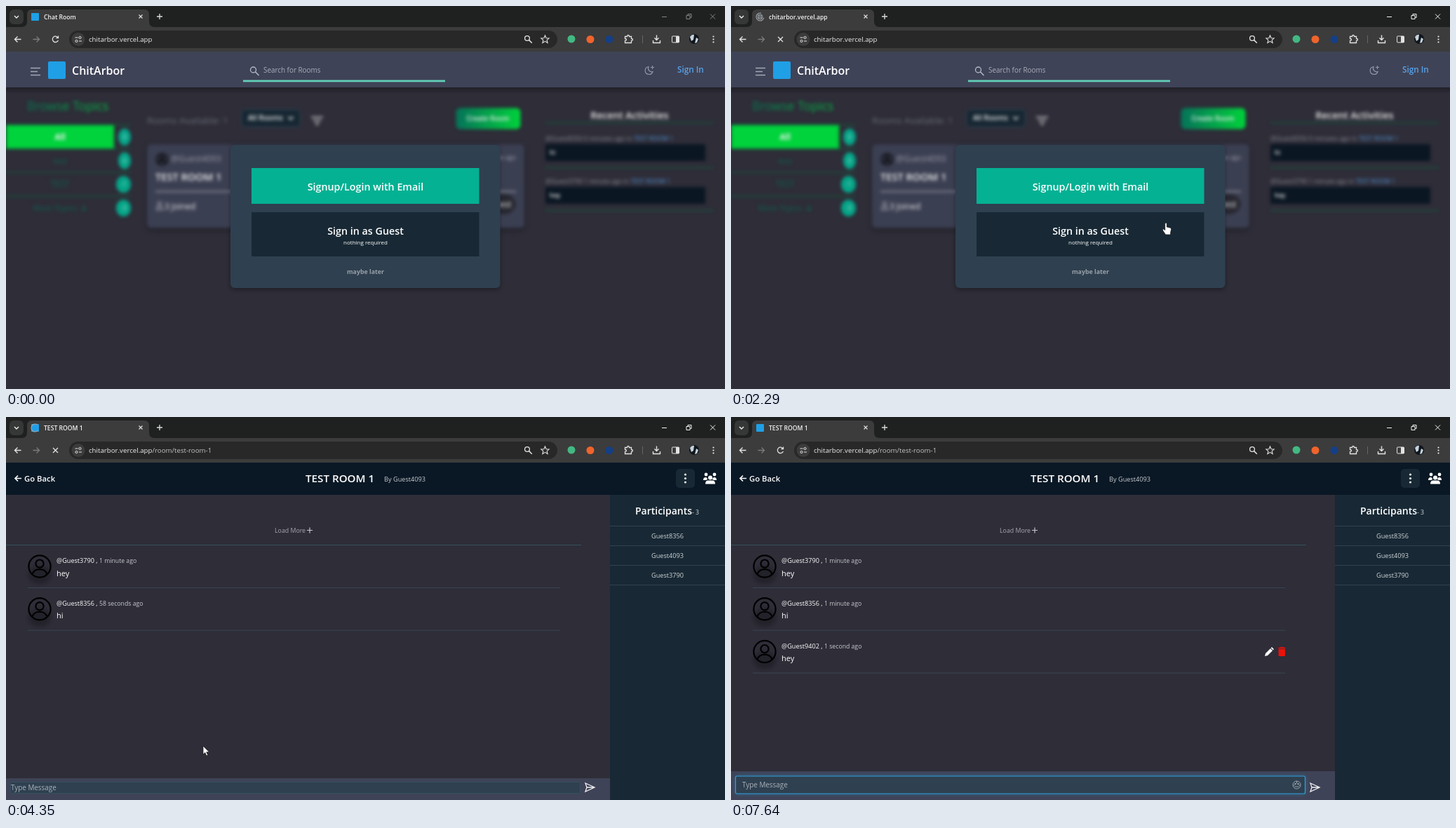
An HTML page for the animation above (8000 ms loop, 1025 px wide and 546 px high).

```html
<!DOCTYPE html>
<html lang="en">
<head>
<meta charset="utf-8">
<title>Chat Room</title>
<style>
  html, body { margin: 0; width: 100%; height: 100%; overflow: hidden; background: #2e2d38; }
  svg { display: block; width: 100%; height: 100%; }
  text { font-family: "Open Sans", "Noto Sans", sans-serif; white-space: pre; }
  .blurred { filter: blur(2.6px) brightness(.94); }
</style>
</head>
<body>
<svg id="stage" viewBox="0 0 1025 546"></svg>
<script>
const LOOP = 8000;
const SITE = 'chitarbor.vercel.app';
const HOST = 'Guest4093', FIRST = 'Guest8356', SECOND = 'Guest3790', SELF = 'Guest9402';

// Markup helpers
const text = (x, y, s, size, fill = '#fff', weight = 400, anchor = 'start', extra = '') =>
  `<text x="${x}" y="${y}" font-size="${size}" fill="${fill}" font-weight="${weight}" text-anchor="${anchor}" ${extra}>${s}</text>`;
const mid = (x, y, s, size, fill, weight) => text(x, y, s, size, fill, weight, 'middle');
const rect = (x, y, w, h, fill, r = 0, extra = '') =>
  `<rect x="${x}" y="${y}" width="${w}" height="${h}" rx="${r}" fill="${fill}" ${extra}/>`;
const disc = (x, y, r, fill, extra = '') => `<circle cx="${x}" cy="${y}" r="${r}" fill="${fill}" ${extra}/>`;
const line = (d, stroke = '#fff', width = 1.2, extra = '') =>
  `<path d="${d}" fill="none" stroke="${stroke}" stroke-width="${width}" ${extra}/>`;
const group = (id, body, extra = '') => `<g id="${id}" ${extra}>${body}</g>`;
const gradient = (id, from, to, attrs) =>
  `<linearGradient id="${id}" ${attrs}><stop stop-color="${from}"/><stop offset="1" stop-color="${to}"/></linearGradient>`;
const lens = (x, y, r, color) =>
  line(`M${x + r * .7} ${y + r * .7}l${r * 1.3} ${r * 1.3}`, color, 1.5) + disc(x, y, r, 'none', `stroke="${color}" stroke-width="1.3"`);
const dots = (x, y, gap, r) => [-1, 0, 1].map(i => disc(x, y + i * gap, r, '#eee')).join('');

function person(x, y, r, width, color = '#000') {
  const body = `M${x - r * .66} ${y + r * .68}C${x - r * .5} ${y + r * .12} ${x + r * .5} ${y + r * .12} ${x + r * .66} ${y + r * .68}`;
  const pen = `stroke="${color}" stroke-width="${width}"`;
  return disc(x, y, r, 'none', pen) + disc(x, y - r * .25, r * .36, 'none', pen) + line(body, color, width);
}

const defs = `<defs>
  ${gradient('heading', '#067257', '#00dc42', 'gradientUnits="userSpaceOnUse" x1="20" y1="0" x2="165" y2="0"')}
  ${gradient('create', '#057a5e', '#00e03f', '')}
  ${gradient('shade', 'rgba(0,0,0,.28)', 'rgba(0,0,0,0)', 'x2="0" y2="1"')}
  <filter id="soft" x="-50%" y="-50%" width="200%" height="200%"><feGaussianBlur stdDeviation="3"/></filter>
  <clipPath id="tabClip"><rect x="52" y="6" width="126" height="20"/></clipPath>
</defs>`;

function browser() {
  const icon = '#e3e3e3';
  return rect(0, 0, 1025, 31, '#1f2020') + rect(0, 30, 1025, 35, '#3c3c3c') +
    rect(5, 5, 20, 21, '#363737', 6) + line('M12 14l3 3 3-3', '#eee', 1.4) +
    `<path d="M22 30q8 0 8-8v-10q0-7 7-7h160q7 0 7 7v10q0 8 8 8z" fill="#3c3c3c"/>` +
    rect(36, 10, 11, 11, '#1f9fe6', 1, 'id="favicon"') +
    group('globe', disc(41.5, 15.5, 4, '#85888c') + line('M38 15h7M41.5 12v7', '#55585c', .8)) +
    group('spinner', line('M41.5 10a5.5 5.5 0 1 1-5.5 5.5', '#9da3ab', 1.2)) +
    text(54, 18.8, '', 8.6, '#f1f1f1', 600, 'start', 'id="tabTitle" clip-path="url(#tabClip)"') +
    line('M189.5 12.5l5 5m0-5l-5 5', '#ddd') + line('M215 15h8M219 11v8', '#ddd', 1.3) +
    group('windowButtons', line('M935 15.5h7M970 13.5h5v5h-5zM972 13v-1.500h5v5h-1.500M1004 11.500l7 7m0-7l-7 7', 'currentColor', 1)) +
    line('M21.500 47.500h-9m4-4l-4 4 4 4', icon, 1.4) + line('M38.500 47.500h9m-4-4l4 4-4 4', '#7b7b7b', 1.3) +
    group('reload', line('M74 45a4.200 4.200 0 1 0 .4 4M74.500 42.500v3h-3', icon, 1.3)) +
    group('stop', line('M67 44l7 7m0-7l-7 7', icon, 1.3)) +
    rect(90, 35, 696, 25, '#282828', 12.5) + disc(103, 47.5, 9.5, '#3c3c3c') +
    line('M98.500 45h4M104 50h4', icon) + disc(105.5, 45, 1.6, 'none', `stroke="${icon}"`) + disc(100.5, 50, 1.6, 'none', `stroke="${icon}"`) +
    text(118, 51, '', 9.7, '#ededed', 400, 'start', 'id="address"') +
    lens(743, 46, 3.4, icon) +
    line('M768.500 42l1.600 3.700 4 .3-3 2.600 1 4-3.600-2.200-3.600 2.200 1-4-3-2.600 4-.3z', icon, 1.1) +
    disc(806, 47, 5.5, '#43b883') + disc(833, 47.5, 5.5, '#f0642c') + disc(860, 47.5, 5.5, '#153f86') +
    line('M882.500 43.500h3q0-2 1.500-2t1.500 2h3v3q2 0 2 1.500t-2 1.500v3h-9v-3q2 0 2-1.500t-2-1.500z', icon, 1.3) +
    line('M907.500 42v11', '#666', 1) +
    line('M927.500 41.500v7m-3-3l3 3 3-3M922.500 49v3.500h10v-3.500', icon, 1.4) +
    rect(949.5, 43, 10, 9, 'none', 1, `stroke="${icon}"`) + rect(955, 43, 4.500, 9, icon) +
    disc(981, 47, 7, '#11161c') + `<path d="M975 44q3-4 6-3l-1 7-3 2zM984 45l3 2-2 5-3 1z" fill="#c5d3dd"/>` +
    dots(1008.5, 47.5, 4, 1.1);
}

function siteHeader() {
  const moon = line('M4 2a5.500 5.500 0 1 1-6-7 5 5 0 0 0 6 7zM3.500-6.500v5M1-4h5', '#8e95a8', 1.2);
  return rect(0, 116, 1025, 9, 'url(#shade)') + rect(0, 65, 1025, 51, '#3f4357') +
    line('M35 88.500h14M35 93.500h10M35 98.500h14', '#a3a8b5', 1.4) +
    rect(60, 79, 25, 25, '#1f9fe6', 2) + text(94, 98, 'ChitArbor', 16, '#fff', 600) +
    lens(352.5, 91, 4, '#b5bac6') + text(367, 94.5, 'Search for Rooms', 9.9, '#a9aebb') +
    rect(338, 105.5, 288, 2.8, '#62cfb8') +
    group('moon', moon) +
    text(957, 95, 'Sign In', 11.7, '#58a3ea', 600, 'start', 'id="signIn"') +
    group('account', disc(994, 91, 12.3, '#343743', 'stroke="#07b04a" stroke-width="1.500"') + person(994, 91, 10, 1.8));
}

function home() {
  const dim = '#0b6a55', rule = '#0c7346';
  const topics = [['All', 0, 12], ['test', 0, 11.4], ['TEST', -1, 12.2], ['More Topics', -3, 11.2]];
  const list = topics.map(([name, count, size], i) => {
    const y = 186.7 + i * 33.8, wide = count < 0;
    return mid(i === 3 ? 70 : 77, y + 4, name, size, i ? dim : '#fff', i ? 400 : 700) +
      `<ellipse cx="${wide ? 167.5 : 169}" cy="${y}" rx="${wide ? 10.5 : 9}" ry="12" fill="#05b091"/>` +
      mid(wide ? 167.5 : 169, y + 3, count, 8.5, '#d6f3ec') +
      (i < 3 ? line(`M0 ${203.5 + i * 33.8}h178`, rule, 1) : '');
  }).join('');
  const activity = (y, who, when, said) =>
    text(769, y, `@${who} ${when} ago in <tspan fill="#58a3ea">TEST ROOM 1</tspan>`, 8.9, '#9296a1') +
    rect(769, y + 5, 228, 24, '#0b1825', 2) + text(775, y + 20, said, 8.9, '#fff', 600) +
    line(`M769 ${y + 38.500}h240`, rule, 1);
  return text(30, 149, 'Browse Topics', 17.6, 'url(#heading)') +
    line('M0 169.500h178', rule, 1) + rect(0, 170, 154, 33, '#00e03f') + list +
    line('M111 283v9m-3.500-3.500l3.500 3.500 3.500-3.500', dim, 1.2) +
    text(201, 168, 'Rooms Available: 1', 13.2, '#70747f') +
    rect(335.5, 147.5, 84, 25, '#182935', 5, 'stroke="#3c5566"') + text(345, 163, 'All Rooms', 10.4, '#fff', 600) +
    line('M402.500 158l3.500 3.500 3.500-3.500', '#fff', 1.6) +
    line('M435 158.500h17M438 163.500h11M441 168.300h5', '#fff', 1.7) +
    rect(641.5, 145.5, 92, 30, 'url(#create)', 6) + mid(687, 164, 'Create Room', 9.8, '#fff', 600) +
    rect(201, 199, 538, 120, 'rgba(0,0,0,.4)', 6, 'filter="url(#soft)"') + rect(201, 197, 538, 119.5, '#3f4357', 6) +
    person(222.5, 218.5, 8, 1.6) + text(235, 222, '@' + HOST, 12.1, '#a0a4b1') +
    text(727, 218.5, '3 minutes ago', 8.8, '#b2b5be', 400, 'end') +
    text(213, 249, 'TEST ROOM 1', 14.6, '#fff', 600) + line('M213 264.500h514', '#d5d7de', 1) +
    disc(219, 282, 2.8, 'none', 'stroke="#d5d7de"') + line('M214.500 290.500v-2q0-2 2-2h5q2 0 2 2v2z', '#d5d7de', 1) +
    text(226, 289.5, '3 Joined', 11.8) +
    `<ellipse cx="710" cy="282.500" rx="16.500" ry="14.500" fill="#2a2a34"/>` + mid(710, 286.5, 'test', 12.2) +
    `<path d="M457 366l36 16h-14l-18-8z" fill="rgba(0,0,0,.4)" filter="url(#soft)"/>` +
    rect(455.5, 341, 28.5, 29.5, '#182935', 2) + mid(470, 359.500, '1', 11.5, '#fff', 700) +
    mid(889, 161, 'Recent Activities', 14, '#fff', 600) + line('M769 166.500h240', rule, 1) +
    activity(192, FIRST, '0 minutes', 'hi') + activity(253, SECOND, '1 minute', 'hey');
}

const modal = () => rect(320, 199, 384, 205, 'rgba(0,0,0,.35)', 6, 'filter="url(#soft)"') +
  rect(320, 198, 384.5, 204, '#2f4050', 6) +
  rect(350, 231, 324.5, 51, '#04b193') + mid(512.5, 262.5, 'Signup/Login with Email', 14.3, '#fff', 600) +
  rect(350, 294, 324.5, 63, '#182935') + mid(512.5, 325.500, 'Sign in as Guest', 14.3, '#fff', 600) +
  mid(512.5, 340, 'nothing required', 8, '#fff') + mid(512.5, 382, 'maybe later', 8.8, '#98a0a8', 700);

function message(y, who, when, said, timeId = '') {
  return `<ellipse cx="48" cy="${y + 12}" rx="16" ry="13" fill="rgba(0,0,0,.25)" filter="url(#soft)"/>` +
    person(48, y, 15.6, 2.2) + text(72, y - 5, `@${who} ,`, 9.1, '#fff', 500) +
    text(133, y - 5, when, 8.7, '#c9cad0', 400, 'start', timeId) + text(72, y + 13.500, said, 11) +
    line(`M31 ${y + 30.500}h759`, '#384653', 1);
}

function room() {
  const guests = [FIRST, HOST, SECOND].map((name, i) =>
    mid(943, 173 + i * 28, name, 9.2, '#cfd3d8') + line(`M861 ${183.500 + i * 28}h164`, '#32434f', 1)).join('');
  const head = (x, y, r) => disc(x, y, r, '#fff');
  return rect(0, 65, 1025, 481, '#2e2d38') + rect(0, 65, 1025, 46, '#0a1825') +
    line('M22 87.500h-9m4-4l-4 4 4 4', '#fff', 1.7) + text(26, 91.800, 'Go Back', 11.3, '#fff', 600) +
    text(427, 92.800, 'TEST ROOM 1', 15.2, '#fff', 600) + text(539, 92, 'By ' + HOST, 9.2, '#c8ccd2') +
    rect(955, 74, 27, 27, '#182935', 5) + dots(968.5, 87.5, 5.500, 1.6) +
    head(998, 82, 2.4) + head(1010, 82, 2.4) + head(1004, 86.500, 3) +
    `<path d="M997 95.500q0-5 4-5h6q4 0 4 5zM994 90q0-4 3.500-4 2 0 2.500 3l-2 1zM1013 90q0-4-3.500-4-2 0-2.500 3l2 1z" fill="#fff"/>` +
    rect(861, 111, 164, 435, '#182935') +
    text(897, 139, 'Participants', 14, '#fff', 600) + text(978, 139, '- 3', 8.7, '#d8dbdf') +
    line('M861 155.500h164', '#32434f', 1) + guests +
    text(383, 165, 'Load More', 8.8, '#a9a9b1') + line('M429 161.500h8M433 157.500v8', '#c5c5ca', 1.2) +
    line('M0 182.500h820', '#34505a', 1) +
    message(213, SECOND, '1 minute ago', 'hey') + message(273.7, FIRST, '', 'hi', 'id="sentAt"') +
    group('reply', message(334.5, SELF, '1 second ago', 'hey') +
      `<path d="M761 341l1-4 7-7 3 3-7 7zM769.700 329.300l1.300-1.300 3 3-1.300 1.300z" fill="#fff"/>` +
      rect(780.5, 331, 9.500, 10, '#e8130b', 1) + rect(780, 328.700, 10.500, 1.600, '#e8130b') + rect(783, 327.800, 4.500, 1, '#e8130b')) +
    rect(0, 515, 861, 31, '#3f4357', 0, 'id="composer"') +
    rect(6.5, 520.5, 812, 16, '#2f4050', 2, 'id="glow" filter="url(#soft)"') +
    rect(6.5, 520.5, 812, 16, '#2f4050', 2, 'id="field"') + text(7, 532, '', 9.9, '#aab2ba', 400, 'start', 'id="draft"') +
    group('emoji', disc(806.5, 524.5, 5.500, 'none', 'stroke="#9ba5ae"') + disc(804.500, 523, 1.2, '#9ba5ae') + disc(808.500, 523, 1.2, '#9ba5ae') +
      line('M803.500 527h6M806.500 519v3M801.500 525h2M809.500 525h2', '#9ba5ae', 1)) +
    line('M826 522l13 6-13 6 2-6zM828 528h10', '#f0f0f2', 1.3);
}

const cursors = group('arrow', `<path d="M0 0v12l2.800-2.600 2 4.600 2-.9-2-4.400h4z" fill="#fff" stroke="#111" stroke-width=".7"/>`) +
  group('hand', `<path d="M-1.300 1q1.300-2 2.600 0v5l5 1.200q1.500.4 1.300 2l-1 5v2.800h-7l-4-6q-1-2 .8-2l2.300 1.500z" fill="#fff" stroke="#111" stroke-width=".7"/>`) +
  group('beam', line('M-2-6h4M0-6v12M-2 6h4', '#e8e8e8', 1));

const stage = document.getElementById('stage');
stage.innerHTML = defs + rect(0, 0, 1025, 546, '#2e2d38') + group('home', home()) + group('siteHeader', siteHeader()) +
  group('modal', modal()) + group('room', room()) + browser() + cursors;

const $ = id => document.getElementById(id);
const show = (id, on) => { $(id).style.display = on ? '' : 'none'; };
const set = (id, attrs) => { for (const k in attrs) $(id).setAttribute(k, attrs[k]); };
const within = (t, a, b) => t >= a && t < b;

// Pointer moves: start, end, steps, from x, y, to x, y, shape (hover rule when empty)
const moves = [
  [330, 560, 4, 639, 401, 599, 297],
  [740, 880, 3, 599, 304, 598, 311],
  [1130, 1370, 4, 603, 312, 620, 309],
  [2520, 2750, 4, 560, 301, 349, 265, 'hand'],
  [2820, 2900, 2, 349, 250, 349, 234, 'hand'],
  [3060, 3060, 1, 349, 234, 349, 234, 'arrow'],
  [3400, 3470, 2, 348, 237, 346, 240, 'hand'],
  [4040, 4280, 4, 340, 285, 296, 426],
  [4350, 4430, 2, 281, 469, 271, 503],
  [4520, 4840, 5, 266, 516, 262, 524, 'beam'],
];

function pointer(t) {
  const move = t < 5010 && moves.filter(m => t >= m[0]).pop();
  if (!move) return null;
  const [start, end, steps, x0, y0, x1, y1, shape] = move;
  const last = steps - 1;
  const k = last ? Math.min(last, Math.floor((t - start) / (end - start) * last + .06)) / last : 0;
  const x = x0 + (x1 - x0) * k, y = y0 + (y1 - y0) * k;
  const hover = t < 2320 ? y > 294 && y < 357 : y < 316;
  return { x, y, shape: shape || (hover ? 'hand' : 'arrow') };
}

function draw(t) {
  const signedIn = t >= 2320, inRoom = t >= 4350;
  const reloading = within(t, 1130, 2560), entering = within(t, 3630, 4680);
  const loading = reloading || entering, bare = loading && !inRoom;
  const path = t >= 3630 ? '/room/test-room-1' : '';

  $('windowButtons').style.color = t < 100 ? '#858585' : '#f2f2f2';
  $('tabTitle').textContent = inRoom ? 'TEST ROOM 1' : bare ? SITE + path : 'Chat Room';
  $('address').innerHTML = SITE + `<tspan fill="#c3c3c3">${path}</tspan>`;
  show('favicon', !bare);
  show('globe', bare);
  show('spinner', loading);
  show('stop', loading);
  show('reload', !loading);
  set('spinner', { transform: `rotate(${t * .36 % 360} 41.5 15.5)` });

  $('home').classList.toggle('blurred', !signedIn);
  show('home', !inRoom);
  show('siteHeader', !inRoom);
  show('modal', !signedIn);
  show('signIn', !signedIn);
  show('account', signedIn);
  set('moon', { transform: `translate(${signedIn ? 945 : 918} 91.5)` });

  show('room', inRoom);
  show('reply', t >= 7640);
  $('sentAt').textContent = t < 6740 ? '58 seconds ago' : '1 minute ago';
  const focus = Math.max(0, Math.min(1, (t - 4760) / 160));
  const box = { y: 520.5 - 8.5 * focus, height: 16 + 9 * focus };
  set('composer', { y: 515 - 10 * focus, height: 31 + 10 * focus });
  set('field', { ...box, stroke: focus ? '#2f9fd8' : '#34505f', 'stroke-width': 1 + .2 * focus });
  set('glow', { ...box, fill: '#2388c0', opacity: .6 * focus });
  show('emoji', focus > 0);
  const typed = within(t, 5830, 6740) ? 'hey'.slice(0, 1 + Math.floor((t - 5830) / 80)) : '';
  $('draft').textContent = typed || 'Type Message';
  set('draft', { x: 7 + 9 * focus, y: 532 - 4 * focus, fill: typed ? '#fff' : '#aab2ba' });

  const p = pointer(t);
  for (const shape of ['arrow', 'hand', 'beam']) show(shape, p && p.shape === shape);
  if (p) set(p.shape, { transform: `translate(${p.x} ${p.y})` });
}

function tick() {
  draw(performance.now() % LOOP);
  requestAnimationFrame(tick);
}
tick();
</script>
</body>
</html>
```
